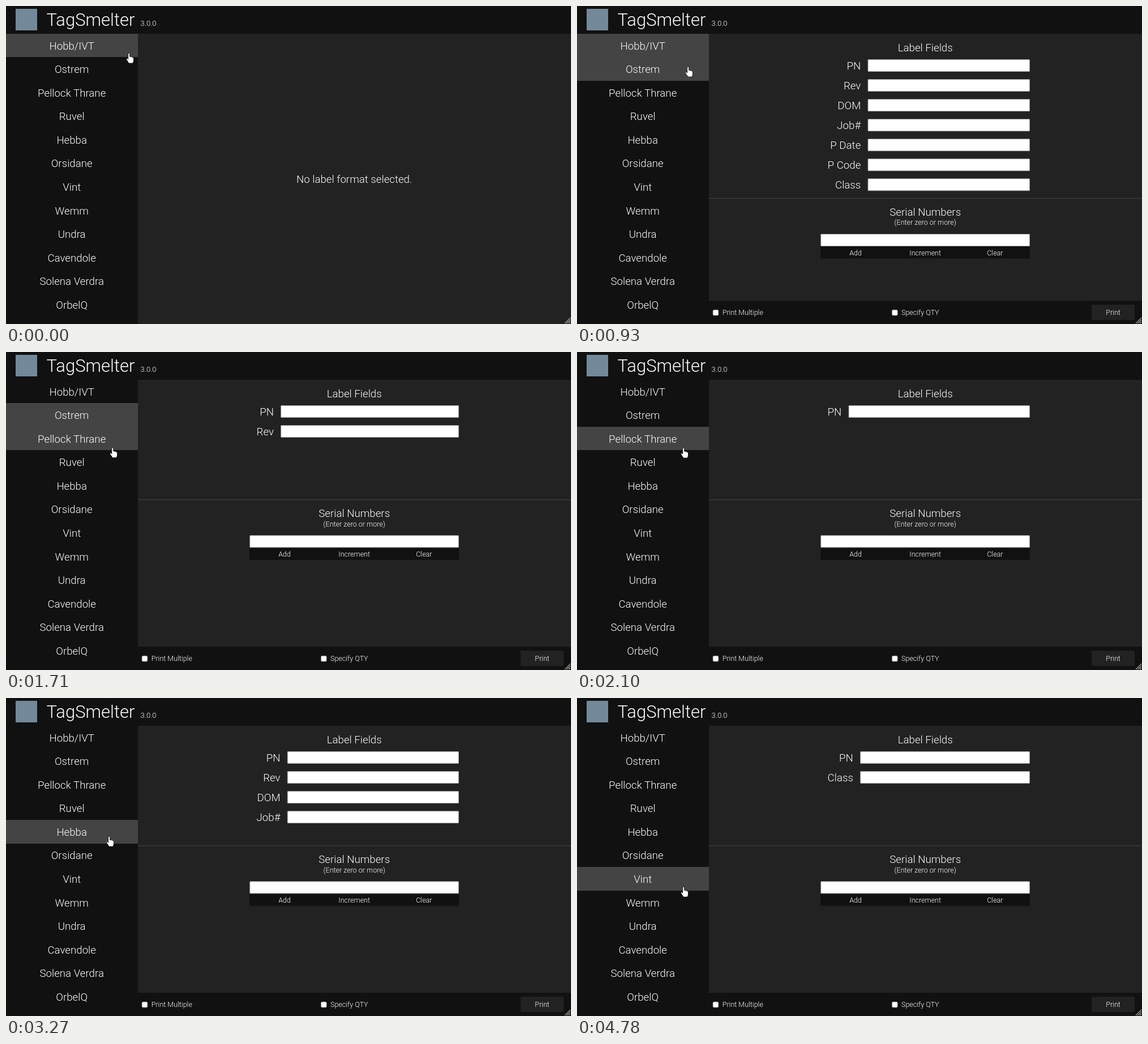
Write an HTML page that moves like this. It is 998 px wide and 561 px high and loops after 4800 ms.

```html
<!DOCTYPE html>
<html lang="en">
<head>
<meta charset="utf-8">
<title>TagSmelter</title>
<style>
html, body { margin: 0; width: 100%; height: 100%; overflow: hidden; background: #222; }
svg { display: block; width: 998px; height: 561px; }
text { font: 300 18.7px Roboto, sans-serif; fill: #fff; }
.small { font-size: 12.5px; }
.mid { text-anchor: middle; }
.end { text-anchor: end; }
</style>
</head>
<body>
<svg id="stage" viewBox="0 0 998 561"></svg>
<script>
const LOOP = 4800, BEAT = 130, ROW = 41.6, TOP = 49, SIDE = 233, MID = 615.2;
const customers = ['Hobb/IVT', 'Ostrem', 'Pellock Thrane', 'Ruvel', 'Hebba', 'Orsidane',
  'Vint', 'Wemm', 'Undra', 'Cavendole', 'Solena Verdra', 'OrbelQ'];
const allFields = ['PN', 'Rev', 'DOM', 'Job#', 'P Date', 'P Code', 'Class'];
const first = n => allFields.slice(0, n);

// Each click: its time, the pointer's place and the fields it opens
const clicks = [
  { at: 0, x: 219, y: 92 },
  { at: 390, x: 197, y: 86, fields: allFields },
  { at: 1190, x: 198, y: 116, fields: first(2) },
  { at: 2100, x: 190, y: 178, fields: first(1) },
  { at: 2620, x: 186, y: 198, fields: first(2) },
  { at: 3270, x: 184, y: 253, fields: first(4) },
  { at: 3930, x: 185.5, y: 284, fields: first(2) },
  { at: 4650, x: 190, y: 342, fields: ['PN', 'Class'] }
];

const rect = (x, y, w, h, fill, more = '') =>
  `<rect x="${x}" y="${y}" width="${w}" height="${h}" fill="${fill}" ${more}/>`;
const text = (x, y, s, cls = '') => `<text x="${x}" y="${y}" class="${cls}">${s}</text>`;
const input = (x, y) =>
  rect(x + .5, y + .5, 799 - x, 21, '#fff', 'stroke="#9c9ca2" stroke-width=".9" rx=".8"');
const check = (x, label) =>
  rect(x, 536, 10, 10, '#fff', 'stroke="#666" stroke-width=".8" rx="2"') +
  text(x + 16.7, 544.6, label, 'small');
const rowTop = i => Math.floor(TOP + ROW * i);

const pen = document.createElement('canvas').getContext('2d');
function textWidth(s) {
  pen.font = '300 18.7px Roboto, sans-serif';
  return pen.measureText(s).width;
}

function form(fields) {
  const x = 454.8 + Math.max(...fields.map(textWidth));
  const dy = fields.length > 4 ? 0 : -78.7;
  const lines = fields.map((name, i) =>
    text(x - 12.2, 111.6 + 35.05 * i, name, 'end') + input(x, 94 + 35.05 * i)).join('');
  const buttons = ['Add', 'Increment', 'Clear'].map((name, i) =>
    text(492 + 123.2 * i, 439.6, name, 'small mid')).join('');
  return text(MID, 79.6, 'Label Fields', 'mid') + lines +
    `<g transform="translate(0 ${dy})">` +
    rect(SIDE, 338.8, 765, 1, '#444') +
    text(MID, 370.1, 'Serial Numbers', 'mid') +
    text(MID, 386.4, '(Enter zero or more)', 'small mid') +
    rect(430.3, 424, 369.7, 21.5, '#111') + input(430.3, 402) + buttons + '</g>' +
    rect(SIDE, 520, 765, 41, '#111') +
    check(240, 'Print Multiple') + check(556.3, 'Specify QTY') +
    rect(909, 527, 76, 27, '#222') + text(947, 544.6, 'Print', 'small mid');
}

const stage = document.getElementById('stage');
stage.innerHTML =
  rect(0, 0, 998, 561, '#222') + rect(0, 0, 998, TOP, '#111') + rect(0, TOP, SIDE, 512, '#111') +
  rect(17, 5, 38, 38, '#73899a') +
  `<text x="71.5" y="34.8" style="font-size:31px">TagSmelter</text>` +
  `<text x="237.5" y="35" style="font-size:13.1px">3.0.0</text>` +
  customers.map((name, i) =>
    rect(0, rowTop(i), SIDE, rowTop(i + 1) - rowTop(i), '#444', 'class="row"') +
    text(116.2, 76.6 + 41.57 * i, name, 'mid')).join('') +
  '<g id="panel"></g>' +
  '<path d="M987 560L997 550M990.5 560L997 553.5M994 560L997 557" stroke="#aaa" stroke-width="1.1"/>' +
  `<path id="hand" fill="#fff" stroke="#000" stroke-width=".8" stroke-linejoin="round"
    d="M-3.3 2V-7.2Q-3.3 -9 -1.8 -9Q-.3 -9 -.3 -7.2V-2.6Q1 -3.4 2 -2.2Q3.4 -2.8 4.2 -1.5
    Q6.4 -1.8 6.5 .6V4Q6.5 6.4 5 9H-2.2Q-3 6.6 -6 3Q-7 1.2 -5.6 .5Q-4.6 .2 -3.3 2Z"/>`;

const rows = stage.querySelectorAll('.row');
const panel = document.getElementById('panel');
const hand = document.getElementById('hand');
let shown;

// After a click the pointer glides to the next place, then rests before clicking
function pointer(t, from, to) {
  const beat = Math.floor((t - from.at) / BEAT) * BEAT;
  const k = Math.min(1, beat / (.6 * (to.at - from.at)));
  const ease = k * k * (3 - 2 * k);
  return [from.x + (to.x - from.x) * ease, from.y + (to.y - from.y) * ease];
}

function draw(t) {
  const n = clicks.filter(c => c.at <= t).length - 1;
  const click = clicks[n], next = clicks[n + 1];
  const [x, y] = next ? pointer(t, click, next) : [click.x, click.y];
  const hover = Math.floor((y - 8 - TOP) / ROW);
  hand.setAttribute('transform', `translate(${x} ${y})`);
  rows.forEach((row, i) =>
    row.setAttribute('visibility', i === hover || i === n - 1 ? 'visible' : 'hidden'));
  if (n !== shown) {
    shown = n;
    panel.innerHTML = click.fields
      ? form(click.fields) : text(MID, 311.8, 'No label format selected.', 'mid');
  }
}

const begin = performance.now();
function tick() {
  draw((performance.now() - begin) % LOOP);
  requestAnimationFrame(tick);
}
tick();
</script>
</body>
</html>
```
